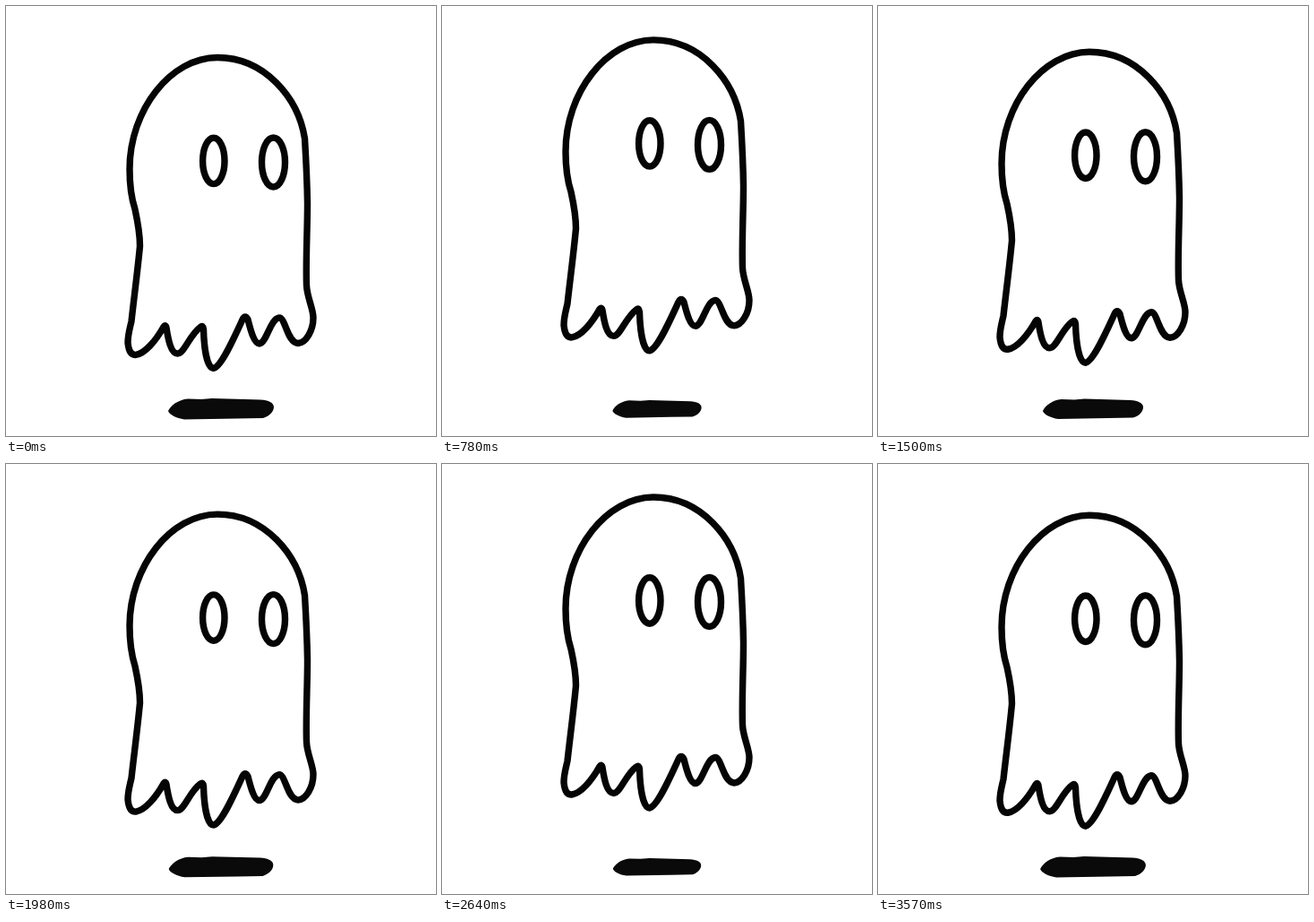
Write an HTML page that moves like this. It is 480 px wide and 480 px high and loops after 3.6 s.

```html
<!DOCTYPE html>
<html lang="en">
<head>
<meta charset="utf-8">
<title>Floating ghost</title>
<style>
  html, body { margin: 0; width: 100%; height: 100%; overflow: hidden; background: #fff; }
  svg { display: block; width: 100vw; height: 100vh; }
</style>
</head>
<body>
<svg viewBox="0 0 480 480">
  <path id="shadow" fill="#0a0a0a" d="M181 452C184 446 192 439.5 203 438.5L218 439L230 438L284 439.5
    C293 440 299 443 299 447.5C299 453 294 458 287 460L258 460.5L199 461.5C190 460 182 456 181 452Z"/>
  <g id="ghost" fill="#fff" stroke="#050505" stroke-width="7.4" stroke-linejoin="round">
    <path d="M236 57.5C184 57.5 138 116 138 182C138 200 139.5 213 144 227C147.5 243 149.5 256 149.5 268
      C147 295 143 325 140 352C138 361 136 367 136 376C137 386 140 390 145 389.5
      C155 388 167 374 176 358Q178 355 179 359C181 372 184 388 191.5 388
      C199 388 205 367 217 358.5Q220 356 220.5 361C221 380 224 404.5 231.5 404.5
      C240 403 253 374 264 350Q267 344 270 350C273 362 277 377 283 377
      C291 376 295 349 305 348C312 348 314 376 326 376.5C335 376 343 362 343 348
      C343 338 336 325 335.5 312C334.5 285 336.5 250 336.5 220C336 190 334.5 165 333.5 148
      C326.5 103 289 57.5 236 57.5Z"/>
    <ellipse cx="231.8" cy="173" rx="12.2" ry="25.7"/>
    <ellipse cx="298.5" cy="174.5" rx="13" ry="27.5"/>
  </g>
</svg>
<script>
  const ghost = document.getElementById('ghost');
  const shadow = document.getElementById('shadow');
  const PERIOD = 1800, STEP = 30, LOWEST_AT = 30, HEIGHT = 21;

  function draw() {
    const t = Math.floor(performance.now() / STEP) * STEP;
    const lift = (1 - Math.cos((t - LOWEST_AT) / PERIOD * 2 * Math.PI)) / 2;
    ghost.setAttribute('transform', `translate(0 ${-HEIGHT * lift})`);
    shadow.setAttribute('transform', `translate(240 450) scale(${1 - 0.17 * lift}) translate(-240 -450)`);
    requestAnimationFrame(draw);
  }
  draw();
</script>
</body>
</html>
```
